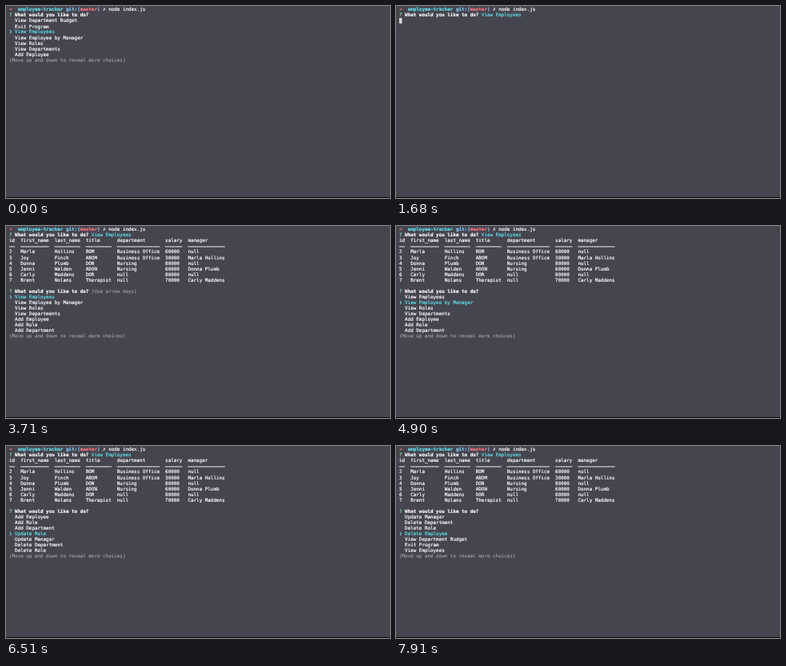
Write an HTML page that moves like this. It is 480 px wide and 241 px high and loops after 8 s.

```html
<!DOCTYPE html>
<html lang="en">
<head>
<meta charset="utf-8">
<title>Employee tracker</title>
<style>
  html, body { margin: 0; width: 100%; height: 100%; overflow: hidden; background: #45454f; }
  #stage { position: relative; width: 480px; height: 241px; overflow: hidden; background: #45454f; }
  #edge { position: absolute; left: 0; right: 0; bottom: 0; height: 1px; background: #08080c; }
  /* Laid out large and scaled down so columns keep fractional widths. */
  #term {
    position: absolute; left: 3.9px; top: 1.2px; margin: 0;
    font: 60px/71.6px "DejaVu Sans Mono", monospace;
    text-rendering: geometricPrecision; font-variant-ligatures: none;
    -webkit-text-stroke: 2px;
    color: #fafafc; transform: scale(.0982); transform-origin: 0 0; white-space: pre;
  }
  .cyan { color: #5fdde8; }
  .blue { color: #7cc8f6; }
  .red { color: #ff737d; }
  .green { color: #8be3a4; }
  .gray { color: #96969f; }
  .mark { color: #eeeede; }
  .cursor { background: #d8d8dc; }
</style>
</head>
<body>
<div id="stage"><pre id="term"></pre><div id="edge"></div></div>
<script>
const LOOP = 8000;
const PAGE = 7;

const choices = [
  'View Employees', 'View Employee by Manager', 'View Roles', 'View Departments',
  'Add Employee', 'Add Role', 'Add Department', 'Update Role', 'Update Manager',
  'Delete Department', 'Delete Role', 'Delete Employee',
  'View Department Budget', 'Exit Program'
];

const widths = [2, 10, 9, 9, 15, 6, 13];
const rows = [
  ['id', 'first_name', 'last_name', 'title', 'department', 'salary', 'manager'],
  widths.map(w => '─'.repeat(w)),
  ['2', 'Marla', 'Hollins', 'BOM', 'Business Office', '60000', 'null'],
  ['3', 'Joy', 'Finch', 'ABOM', 'Business Office', '30000', 'Marla Hollins'],
  ['4', 'Donna', 'Plumb', 'DON', 'Nursing', '80000', 'null'],
  ['5', 'Jenni', 'Walden', 'ADON', 'Nursing', '60000', 'Donna Plumb'],
  ['6', 'Carly', 'Maddens', 'DOR', 'null', '80000', 'null'],
  ['7', 'Brent', 'Nolans', 'Therapist', 'null', '70000', 'Carly Maddens']
];

const span = (cls, text) => `<span class="${cls}">${text}</span>`;
const bold = (cls, text) => `<b class="${cls}">${text}</b>`;

const shell = span('red', '➜') + '  ' + bold('cyan', 'employee-tracker') + ' ' +
  bold('blue', 'git:(') + bold('red', 'master') + bold('blue', ')') + ' ' +
  span('mark', '✗') + ' node index.js';
const question = span('green', '?') + ' ' + bold('', 'What would you like to do?') + ' ';
const answered = [shell, question + span('cyan', choices[0])];
const table = rows.map(r => r.map((v, i) => v.padEnd(widths[i] + 2)).join(''));

function menu(active, pointer, hint = '') {
  const lines = [question + span('gray', hint)];
  for (let i = 0; i < PAGE; i++) {
    const n = (active - pointer + i + choices.length) % choices.length;
    lines.push(i === pointer ? span('cyan', '❯ ' + choices[n]) : '  ' + choices[n]);
  }
  lines.push(span('gray', '(Move up and down to reveal more choices)'));
  return lines;
}

const results = (active, hint) =>
  [...answered, ...table, '', ...menu(active, Math.min(active, 3), hint)];

// Times of each press of the down key.
const presses = [4760, 5180, 5670, 5950, 6090, 6300, 6440, 6720, 7140, 7490, 7700];

const steps = [
  [0, [shell, ...menu(0, 2)]],
  [1050, [...answered, span('cursor', ' ')]],
  [1750, results(0, '(Use arrow keys)')],
  ...presses.map((t, i) => [t, results(i + 1)])
].map(([t, lines]) => [t, lines.join('\n')]);

const term = document.getElementById('term');
const start = performance.now();
let shown = -1;

function draw(now) {
  const t = Math.max(0, now - start) % LOOP;
  let k = steps.length - 1;
  while (steps[k][0] > t) k--;
  if (k !== shown) term.innerHTML = steps[shown = k][1];
  requestAnimationFrame(draw);
}
draw(start);
</script>
</body>
</html>
```
